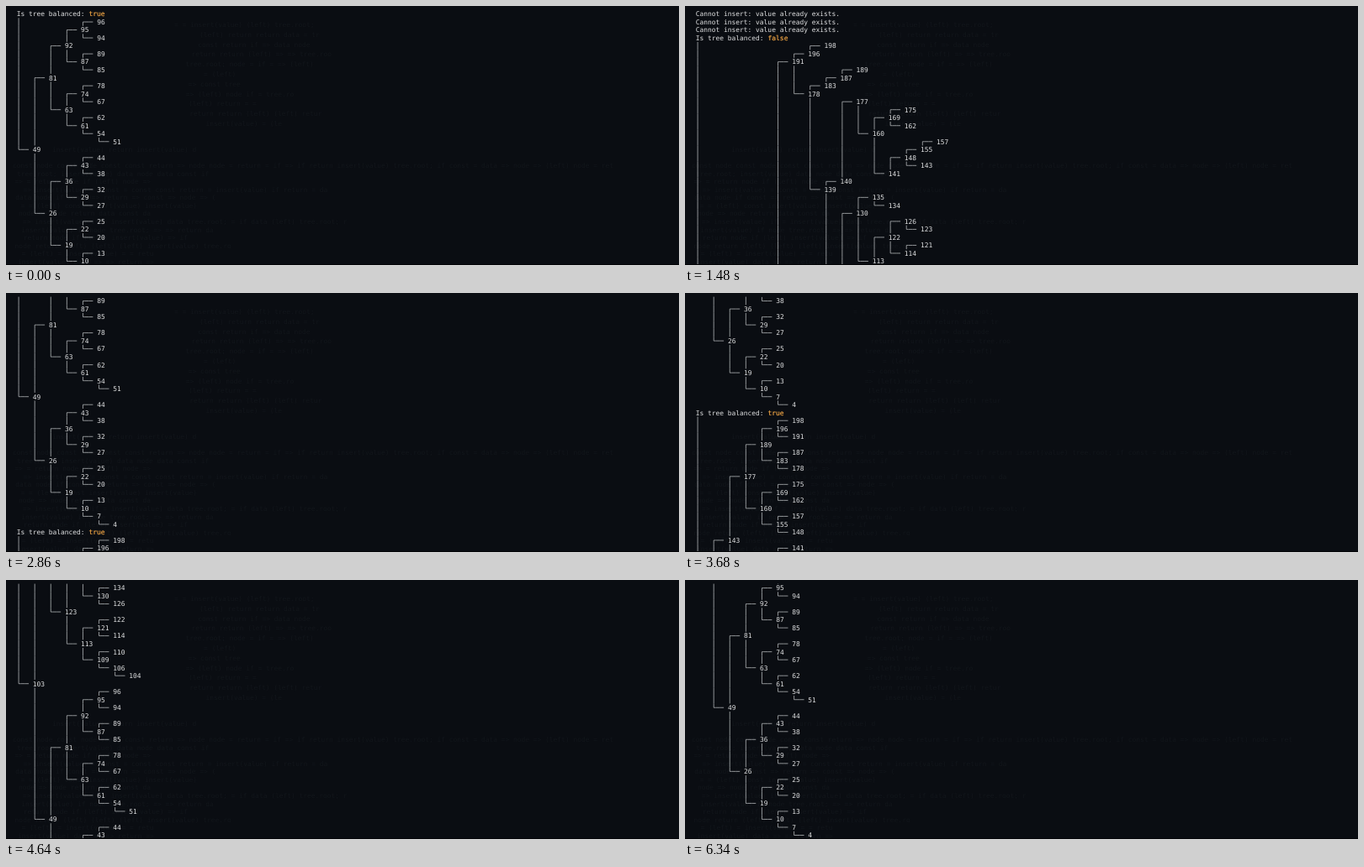
Animation, 800 px wide and 309 px high, one loop 6.36 s. Source, as an HTML page:

```html
<!DOCTYPE html>
<html lang="en">
<head>
<meta charset="utf-8">
<title>Balanced tree demo</title>
<style>
  html, body { margin: 0; width: 100%; height: 100%; overflow: hidden; background: #0a0d12; }
  svg { display: block; width: 800px; height: 309px; }
  text {
    font: 7.926px "DejaVu Sans Mono", monospace;
    fill: #e0e1e2;
    text-rendering: geometricPrecision;
    white-space: pre;
  }
  .bool { fill: #f0a545; stroke: #f0a545; stroke-width: .2px; }
  .wires { fill: none; stroke: #a0a3a5; stroke-width: .9; }
  .ghost text { fill: #12161b; }
</style>
</head>
<body>
<svg viewBox="0 0 800 309">
  <clipPath id="screen"><rect y="4.5" width="800" height="304.5"/></clipPath>
  <rect width="800" height="309" fill="#0a0d12"/>
  <g class="ghost" id="ghost"></g>
  <g clip-path="url(#screen)"><g id="log"></g></g>
  <rect y="308" width="800" height="1" fill="#030406"/>
</svg>
<script>
const LOOP = 6360, STEP = 20;
const LEFT = 12.7, TOP = 9.5, COL = 4.772, ROW = 9.516, BASE = 2.9;

// The values the program stores; every tree below is computed from them
const SMALL = [4, 7, 10, 13, 19, 20, 22, 25, 26, 27, 29, 32, 36, 38, 43, 44, 49,
  51, 54, 61, 62, 63, 67, 74, 78, 81, 85, 87, 89, 92, 94, 95, 96];
const ADDED = [191, 196, 198, 178, 183, 187, 189, 139, 140, 177, 160, 169, 175, 162,
  141, 148, 155, 157, 143, 110, 130, 135, 134, 113, 122, 126, 123, 114, 121, 104,
  109, 106, 103];

function build(list) {
  if (!list.length) return null;
  const mid = list.length >> 1;
  return { value: list[mid], left: build(list.slice(0, mid)), right: build(list.slice(mid + 1)) };
}

function insert(node, value) {
  if (!node) return { value, left: null, right: null };
  const side = value < node.value ? "left" : "right";
  node[side] = insert(node[side], value);
  return node;
}

function print(node, out = [], prefix = "", isLeft = true) {
  if (!node) return out;
  print(node.right, out, prefix + (isLeft ? "│   " : "    "), false);
  out.push(prefix + (isLeft ? "└── " : "┌── ") + node.value);
  return print(node.left, out, prefix + (isLeft ? "    " : "│   "), true);
}

const lines = [
  "Is tree balanced: true",
  ...print(build(SMALL)),
  ...Array(3).fill("Cannot insert: value already exists."),
  "Is tree balanced: false",
  ...print(ADDED.reduce(insert, build(SMALL))),
  "Is tree balanced: true",
  ...print(build([...SMALL, ...ADDED].sort((a, b) => a - b)))
];

const log = document.getElementById("log");
const ghost = document.getElementById("ghost");

function add(parent, tag, attrs, text = "") {
  const el = document.createElementNS("http://www.w3.org/2000/svg", tag);
  for (const key in attrs) el.setAttribute(key, attrs[key]);
  el.textContent = text;
  parent.append(el);
}

function addText(text, col, y, cls = "") {
  add(log, "text", { x: LEFT + col * COL, y: y + BASE, class: cls }, text);
}

function wire(char, x, y) {
  const cx = x + COL / 2, end = x + COL, up = y - ROW / 2, down = y + ROW / 2;
  switch (char) {
    case "│": return `M${cx} ${up}V${down}`;
    case "─": return `M${x} ${y}H${end}`;
    case "└": return `M${cx} ${up}V${y}H${end}`;
    case "┌": return `M${cx} ${down}V${y}H${end}`;
  }
  return "";
}

let wires = "";
lines.forEach((line, row) => {
  const y = TOP + row * ROW;
  const bool = line.match(/true|false/);
  const start = line.search(/[A-Z0-9]/);
  if (bool) addText(bool[0], bool.index, y, "bool");
  addText(line.slice(start, bool ? bool.index : undefined), start, y);
  [...line.slice(0, start)].forEach((c, i) => wires += wire(c, LEFT + i * COL, y));
});
add(log, "path", { class: "wires", d: wires });

// Faint code behind the translucent terminal
const WORDS = ["const", "node", "=", "tree.root;", "if", "(left)", "return", "insert(value)", "data", "=>"];
let seed = 7;
function random() {
  seed = (seed * 16807) % 2147483647;
  return seed / 2147483647;
}

function ghostLine(x, y, size) {
  let text = "";
  while (text.length < size) text += WORDS[Math.floor(random() * WORDS.length)] + " ";
  add(ghost, "text", { x, y: y + BASE }, text.slice(0, size));
}

for (let y = 22; y < 145; y += 11.8) ghostLine(200 + 40 * random(), y, 8 + 30 * random());
for (let y = 200; y < 309; y += ROW) ghostLine(8 + 14 * random(), y, 32 + 50 * random());
ghostLine(55, 171, 36);
ghostLine(8, 190, 150);

// Scroll strokes: first step, last step, top line reached
const STROKES = [
  [1040, 1480, 34], [1500, 2360, 49], [2520, 2860, 75],
  [3020, 3380, 78], [3520, 4060, 105], [4420, 4960, 139]
];
const ease = k => 1 - (1 - k) ** 1.6;

function topLine(time) {
  let from = 0;
  for (const [start, end, to] of STROKES) {
    if (time < start) break;
    if (time < end) {
      const k = (time - start + STEP) / (end - start + STEP);
      return Math.round(from + (to - from) * ease(k));
    }
    from = to;
  }
  return from;
}

const origin = performance.now();
function draw() {
  const time = (performance.now() - origin) % LOOP;
  const top = topLine(Math.floor(time / STEP) * STEP);
  log.setAttribute("transform", `translate(0 ${-top * ROW})`);
  requestAnimationFrame(draw);
}
draw();
</script>
</body>
</html>
```
